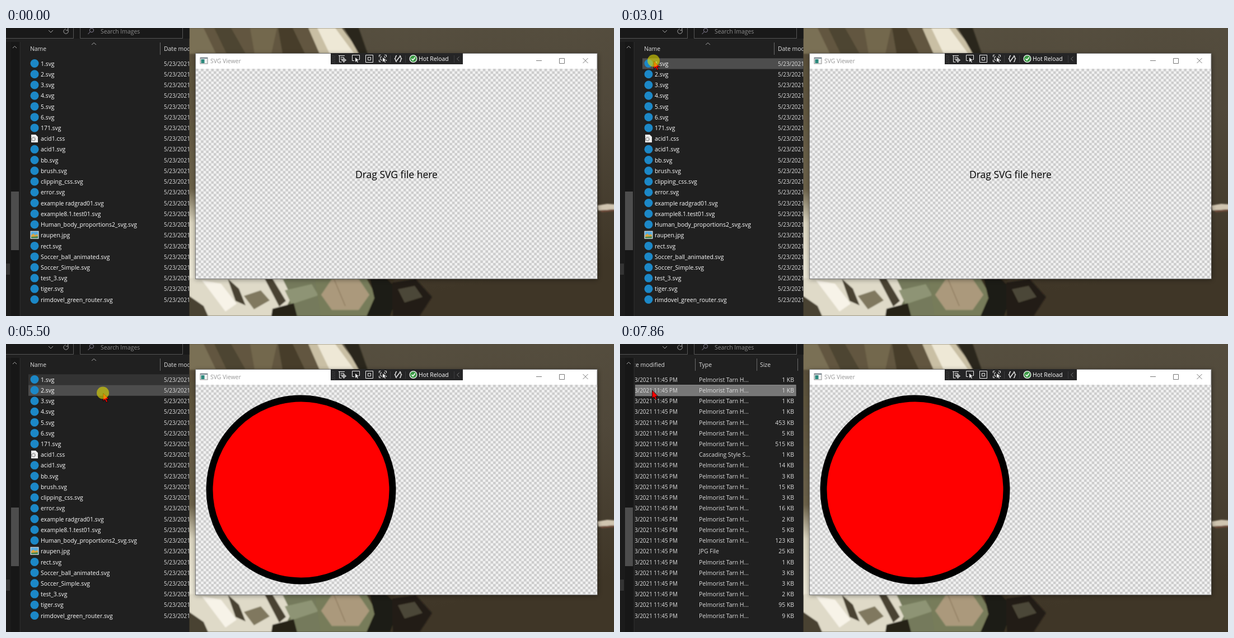
Animation of 1086 by 516 pixels, one loop 8 s. Source, as an HTML page:

```html
<!DOCTYPE html>
<html lang="en">
<head>
<meta charset="utf-8">
<title>SVG Viewer</title>
<style>
html, body { margin: 0; width: 100%; height: 100%; overflow: hidden; background: #202020; }
svg { display: block; width: 1086px; height: 516px; }
text { font: 10.4px "Open Sans", "Noto Sans", sans-serif; fill: #fff; white-space: pre; }
.dim { fill: #dedede; }
.date { font-size: 9.9px; }
.line { fill: none; stroke-width: 1; }
</style>
</head>
<body>
<svg viewBox="0 0 1086 516" xmlns="http://www.w3.org/2000/svg">
  <defs>
    <linearGradient id="ground" x1="0" y1="0" x2="0.25" y2="1">
      <stop offset="0" stop-color="#575040"/>
      <stop offset=".5" stop-color="#50483a"/>
      <stop offset="1" stop-color="#3f3627"/>
    </linearGradient>
    <linearGradient id="edge" x1="0" y1="0" x2="0" y2="1">
      <stop offset="0" stop-color="#5a503a"/>
      <stop offset=".6" stop-color="#6d634b"/>
      <stop offset=".75" stop-color="#ddd7c2"/>
      <stop offset="1" stop-color="#ece8d8"/>
    </linearGradient>
    <pattern id="check" x="339" y="73" width="9.157" height="9.157" patternUnits="userSpaceOnUse">
      <rect width="10" height="10" fill="#f1f1f1"/>
      <path d="M0 0h4.578v4.578H0zM4.578 4.578h4.579v4.579H4.578z" fill="#cdcdcd"/>
    </pattern>
    <clipPath id="pane"><rect x="27" y="20" width="300.5" height="496"/></clipPath>
    <filter id="soft" x="-5%" y="-5%" width="110%" height="110%"><feGaussianBlur stdDeviation="1"/></filter>
    <filter id="shade" x="-5%" y="-5%" width="110%" height="110%"><feGaussianBlur stdDeviation="4"/></filter>
  </defs>

  <!-- desktop -->
  <rect x="327" width="759" height="516" fill="url(#ground)"/>
  <g filter="url(#soft)">
    <path d="M327 0H560l18 50H327Z" fill="#62573f"/>
    <path d="M327 0h26l22 46h-48Z" fill="#7a6f55"/>
    <path d="M372 0h30l26 46h-34Z" fill="#4e4531"/>
    <path d="M436 0h48l-10 46h-30Z" fill="#73684e"/>
    <path d="M486 0h26l22 46h-40Z" fill="#463d2b"/>
    <path d="M540 0h60l34 46H560Z" fill="#c9bfa4"/>
    <path d="M556 0h32l34 46h-44Z" fill="#eee8d6"/>
    <path d="M604 0h26l16 46h-16Z" fill="#2c261b"/>
    <path d="M326 46h14v404h-14Z" fill="url(#edge)"/>
    <path d="M327 448H690L724 516H327Z" fill="#3a3323"/>
    <path d="M327 448h175l18 26-28 42H327Z" fill="#dfdac8"/>
    <path d="M327 480l26 18 8 18h-34ZM396 449l20 18 12 30-18-8ZM462 449l14 0 24 40-12 10Z" fill="#4a4332"/>
    <path d="M425 480l30-10 16 18-28 16Z" fill="#80785f"/>
    <path d="M350 452l34 6 28 36-20 14Z" fill="#f7f3e8"/>
    <path d="M494 449h84l-18 34 10 33h-78l18-34Z" fill="#747a5b"/>
    <path d="M498 470l48-11 12 20-48 16Z" fill="#8e9474"/>
    <path d="M476 503l38-10 6 23h-46Z" fill="#272318"/>
    <path d="M552 449h92l20 36-16 31h-86Z" fill="#777c5a"/>
    <path d="M582 450h48l19 28-19 27h-48l-19-27Z" fill="#ab997c" stroke="#989373"/>
    <path d="M586 450l20 48" stroke="#7d6a4e"/>
    <path d="M650 449h30l22 22-16 45h-42l14-32Z" fill="#1f1b14"/>
    <path d="M690 456l42-6 29 32-22 34h-48Z" fill="#241f17"/>
    <path d="M700 468l30-6 14 20-32 10Z" fill="#4c4638"/>
    <path d="M1056 318l18-3 14 1v9l-30 2Z" fill="#d0c5b0"/>
    <path d="M1060 327l28-2v3l-24 2Z" fill="#6f4a39"/>
  </g>

  <!-- file list -->
  <rect width="327.5" height="516" fill="#202020"/>
  <rect width="327.5" height="19" fill="#191919"/>
  <rect y="25" width="25" height="491" fill="#1b1b1b"/>
  <rect x="9" y="25" width="14" height="491" fill="#171717"/>
  <rect x="9" y="293" width="14" height="105" fill="#4d4d4d"/>
  <rect y="422" width="7" height="20" fill="#333"/>
  <path class="line" d="M25.5 25V516" stroke="#2d2d2d"/>
  <path class="line" d="M0 18.5H120.5V0M132.5 0V18.5H315.5V0" stroke="#555"/>
  <path class="line" d="M12 36l3.5-3.5L19 36M76 4l4 4 4-4M110.5 3.5a4.2 4.2 0 1 1-4-1.7M110.8 0v4h-4" stroke="#a8a8a8"/>
  <g class="line" stroke="#858094"><circle cx="153" cy="4" r="3.6"/><path d="M150.5 6.5l-4 4.5"/></g>
  <text x="169" y="10" style="fill:#8c8c8c">Search Images</text>
  <g clip-path="url(#pane)">
    <g id="list">
      <path class="line" d="M275.5 26V48M405.5 26V48M515.5 26V48M588.5 26V48" stroke="#6a6a6a"/>
      <path class="line" d="M153 30l4-3.5 4 3.5" stroke="#a0a0a0"/>
      <g id="head"></g>
      <g id="rows"></g>
    </g>
    <rect id="band" fill="rgba(0,92,175,.4)" stroke="#1874bd"/>
  </g>

  <!-- viewer window -->
  <rect x="338" y="47" width="719" height="404" opacity=".4" filter="url(#shade)"/>
  <rect x="338.5" y="45.5" width="717.5" height="404" fill="#fff" stroke="#777"/>
  <rect x="339" y="73" width="717" height="376" fill="url(#check)"/>
  <rect x="347" y="53" width="13" height="11" fill="#f4f4f4" stroke="#8b8b8b"/>
  <path d="M347 53h13v2h-13z" fill="#7a8a94"/><path d="M348.5 56h6v7h-6z" fill="#2d897d"/>
  <text x="365" y="63" style="fill:#969696">SVG Viewer</text>
  <path class="line" d="M947 58.5h10M988.5 54.5h9v9h-9zM1030.5 54l9 9M1039.5 54l-9 9" stroke="#777"/>
  <text id="hint" x="624" y="269" style="font-size:17.5px;fill:#000">Drag SVG file here</text>
  <circle id="disc" cx="527" cy="261" r="163.5" fill="#f00" stroke="#000" stroke-width="12"/>

  <!-- debug toolbar -->
  <rect x="580" y="45" width="236" height="20" fill="#252526"/>
  <path class="line" d="M584 49v13M587 50v13" stroke="#68686a" stroke-dasharray="1 2"/>
  <g class="line" stroke="#eee">
    <path d="M594 49.5h11M595.5 49v12h4M597.5 52.5h6M597.5 55.5h3"/>
    <circle cx="603.5" cy="57.5" r="2.8"/><path d="M603.5 53v9M599 57.5h9"/>
    <path d="M622 58.5h-3.5v-10h13v8H630"/>
    <path d="M642.5 48.5h13v13h-13zM646.5 52.5h5v5h-5z"/>
    <path d="M666.5 52v-3.5h3M676 48.5h3.5V52M666.5 57v3.5h3M679.5 57v2M671 51.5h-2v6h3M675 51.5h2v3"/>
    <path d="M624 53v8l2-2 2 3 1-1-2-3h3zM673 53v8l2-2 2 3 1-1-2-3h3z" fill="#eee" stroke="none"/>
    <path d="M698 49.5c-3 0-1 4-3.5 5.5 2.5 1.5.5 5.5 3.5 5.5M703 49.5c3 0 1 4 3.5 5.5-2.5 1.5-.5 5.5-3.5 5.5M703.5 51l-6 8" stroke-width="1.4"/>
    <path d="M686.5 49v13M713.5 49v13M800.5 49v13" stroke="#3b3b3e"/>
    <path d="M809.5 51.5l-4 3.8 4 3.8" stroke="#777"/>
  </g>
  <circle cx="727.5" cy="55" r="7" fill="#f4f4f4"/>
  <circle cx="727.5" cy="55" r="5.8" fill="#3b9a45"/>
  <path d="M724.5 55l2.3 2.5 4-5" fill="none" stroke="#fff" stroke-width="1.6"/>
  <text x="737" y="59">Hot Reload</text>

  <path id="arrow" d="M.5 0V14.5L3.8 11.6 6.2 16.5 8.6 15.4 6.4 10.8H10.8Z" fill="#f00" stroke="#000" stroke-width=".8"/>
  <circle id="press" r="11" fill="rgba(229,221,0,.6)"/>
</svg>
<script>
const $ = id => document.getElementById(id);
const NS = 'http://www.w3.org/2000/svg';
const LOOP = 8000, TOP = 54.3, PITCH = 19.23, LAG = 40, SCROLL = 271;

function set(el, attrs) { for (const k in attrs) el.setAttribute(k, attrs[k]); }
function add(parent, tag, attrs, label) {
  const el = document.createElementNS(NS, tag);
  set(el, attrs);
  if (label) el.textContent = label;
  return parent.appendChild(el);
}
function show(el, on) { el.style.visibility = on ? 'visible' : 'hidden'; }

// name and size in KB
const files = `1.svg 1|2.svg 1|3.svg 1|4.svg 1|5.svg 453|6.svg 5|171.svg 515|acid1.css 1|acid1.svg 14|bb.svg 3|brush.svg 15|clipping_css.svg 3|error.svg 16|example radgrad01.svg 2|example8.1.test01.svg 5|Human_body_proportions2_svg.svg 123|raupen.jpg 25|rect.svg 1|Soccer_ball_animated.svg 3|Soccer_Simple.svg 3|test_3.svg 2|tiger.svg 95|rimdovel_green_router.svg 9`
  .split('|').map(s => s.match(/(.*) (\d+)/).slice(1));
const kinds = { svg: 'Pelmorist Tarn H...', css: 'Cascading Style S...', jpg: 'JPG File' };

function icon(g, ext, y) {
  if (ext === 'svg') add(g, 'circle', { cx: 51, cy: y, r: 7.5, fill: '#1c88c7' });
  else if (ext === 'css') {
    add(g, 'path', { d: `M45 ${y - 7}h8l4 4v10h-12z`, fill: '#eee' });
    add(g, 'circle', { cx: 49, cy: y + 1, r: 3, fill: 'none', stroke: '#888', 'stroke-width': 2, 'stroke-dasharray': '1.5 .8' });
  } else {
    add(g, 'rect', { x: 44, y: y - 7, width: 14, height: 13, fill: '#57abe0', stroke: '#eee' });
    add(g, 'path', { d: `M45 ${y + 5}v-5l4-3 3 3 3-2 2 2v5z`, fill: '#d9a441' });
    add(g, 'path', { d: `M45 ${y + 5}v-2l12-1v3z`, fill: '#3f7f48' });
  }
}

[['Name', 43], ['Date modified', 282], ['Type', 412], ['Size', 521]]
  .forEach(([s, x]) => add($('head'), 'text', { x, y: 41, class: 'dim' }, s));

const bars = files.map(([name, kb], i) => {
  const g = $('rows'), top = TOP + i * PITCH, y = top + 13.3, ext = name.slice(-3);
  const bar = add(g, 'rect', { x: 40, y: top, width: 545, height: PITCH });
  icon(g, ext, top + 9.2);
  add(g, 'text', { x: 62, y }, name);
  add(g, 'text', { x: 282, y, class: 'dim date' }, '5/23/2021 11:45 PM');
  add(g, 'text', { x: 412, y, class: 'dim' }, kinds[ext]);
  add(g, 'text', { x: 582, y, class: 'dim', 'text-anchor': 'end' }, kb + ' KB');
  return bar;
});

// pointer stops: time, x, y
const stops = [
  [700, 441, 502], [1070, 80, 155], [1450, 80, 155], [1610, 72, 66], [1730, 76, 100],
  [1770, 79, 142], [1890, 81, 156], [2060, 72, 98], [2230, 60, 59], [3020, 60, 59],
  [3410, 622, 258], [4410, 622, 258], [4420, 617, 255], [5210, 184, 88], [5250, 184, 88],
  [5290, 173, 88], [5640, 173, 88], [6040, 513, 173], [6660, 513, 173], [6830, 166, 121],
  [6870, 83, 96], [7080, 40, 74], [7160, 40, 78], [7410, 40, 78], [7440, 27, 72],
  [7490, 64, 61], [7530, 92, 66], [7700, 92, 66], [7770, 30, 73], [7860, 57, 83], [8000, 57, 83]
];
function pointer(t) {
  const i = stops.findIndex(s => s[0] > t);
  if (i < 1) return stops[0].slice(1);
  const [a, ax, ay] = stops[i - 1], [b, bx, by] = stops[i];
  let k = (t - a) / (b - a);
  if (b - a > 300) k = k * k * (3 - 2 * k);
  return [ax + (bx - ax) * k, ay + (by - ay) * k];
}
const rowAt = y => Math.floor((y - TOP) / PITCH);
const within = (t, a, b) => t >= a && t < b;

function draw(t) {
  // hover and selection trail the pointer slightly
  const [x, y] = pointer(t), [lx, ly] = pointer(t - LAG);
  const scroll = SCROLL * Math.min(1, Math.max(0, (t - 5760) / 280));
  const banding = within(t, 5640, 7160);
  const hovering = (within(t, 740, 3060) || within(t, 4420, 5640)) && lx > 27 && lx < 327;
  const lo = rowAt(Math.min(88, ly)), hi = rowAt(Math.max(88, ly));

  bars.forEach((bar, i) => {
    let fill = 'none', stroke = 'none';
    if (i === 0 && within(t, 3570, 5640)) fill = '#333';
    if (hovering && rowAt(ly) === i) fill = '#4d4d4d';
    if (i === 0 && within(t, 3060, 3570)) fill = '#777';
    if (banding && i >= lo && i <= hi) { fill = i === 1 ? '#777' : '#666'; stroke = '#7d7d7d'; }
    if (t >= 7160 && i === 1) { fill = '#777'; stroke = '#8c8c8c'; }
    set(bar, { fill, stroke });
  });

  set($('list'), { transform: `translate(${-scroll})` });
  const left = 173 - scroll;
  set($('band'), {
    x: Math.min(left, lx), y: Math.min(88, ly),
    width: Math.abs(lx - left), height: Math.abs(ly - 88)
  });
  show($('band'), banding);
  show($('hint'), t < 3870);
  show($('disc'), t >= 3870);

  set($('arrow'), { transform: `translate(${x} ${y})` });
  show($('arrow'), t >= 700 && !within(t, 3060, 3570));
  set($('press'), { cx: x, cy: y - 0.5 });
  show($('press'), within(t, 3010, 3570) || within(t, 5500, 7160));
}

const start = performance.now();
function tick() {
  draw((performance.now() - start) % LOOP);
  requestAnimationFrame(tick);
}
tick();
</script>
</body>
</html>
```
